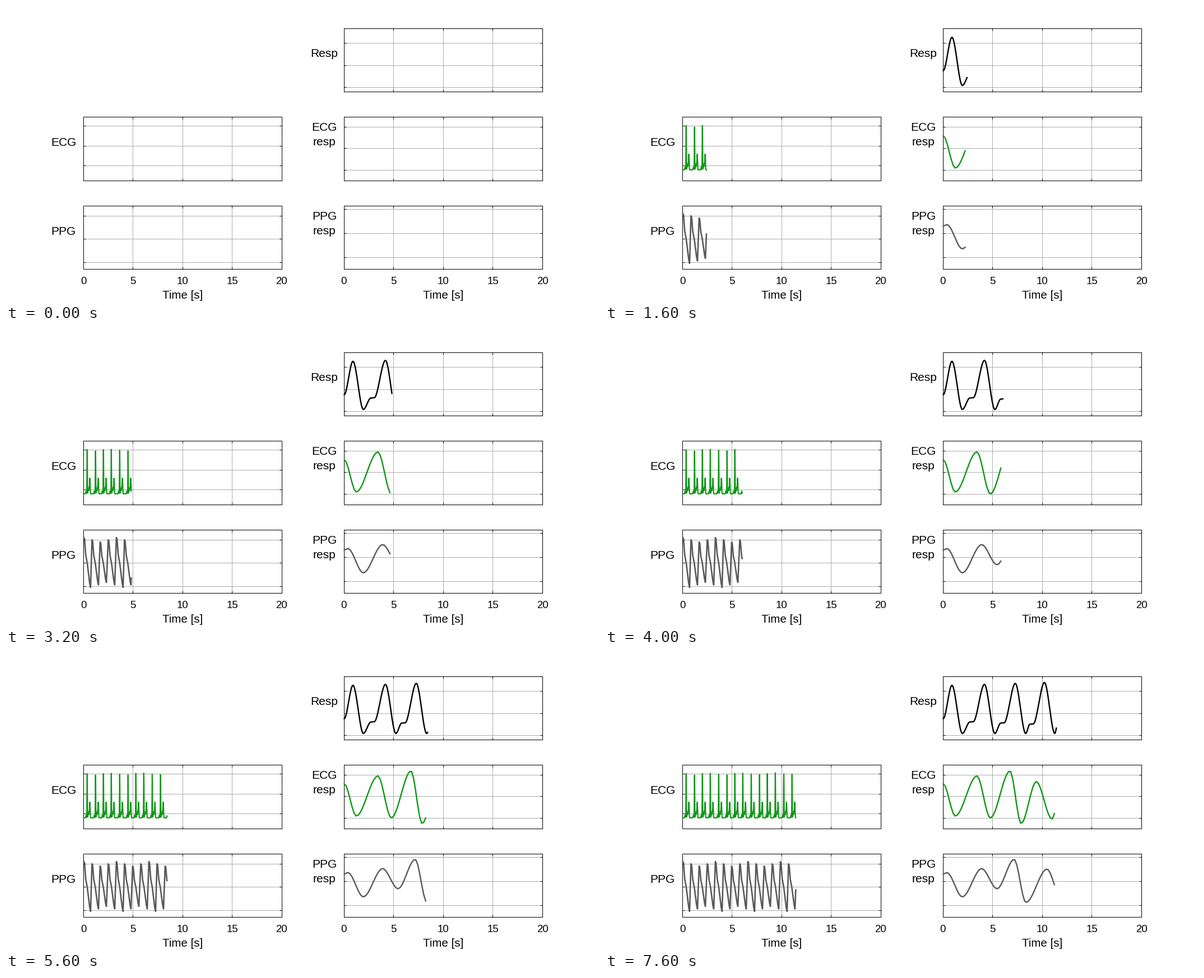
A matplotlib script for the animation above (8000 ms loop, 1058 px wide and 529 px high).

```python
import numpy as np
import matplotlib.pyplot as plt
from matplotlib.animation import FuncAnimation

W, H, DPI = 1058, 529, 100
PT = 72 / DPI                  # points per pixel
LEFT, RIGHT, SPAN = 138, 603, 354
RATE = SPAN / 20               # pixels per second of signal
FRAMES, STEP = 20, 0.6         # seconds of signal added per frame
BEAT, BEATS = 14.5, 15         # heartbeat spacing in pixels, beats drawn
GREEN, GRAY = "#109618", "#595959"

plt.rcParams["font.family"] = "Liberation Sans"
fig = plt.figure(figsize=(W / DPI, H / DPI), dpi=DPI, facecolor="white")
ax = fig.add_axes([0, 0, 1, 1])
ax.set_xlim(-0.5, W - 0.5)     # whole numbers are pixel centres
ax.set_ylim(H - 0.5, -0.5)
ax.axis("off")


def stroke(xs, ys, color="black", width=1, z=2, cap="butt"):
    return ax.plot(xs, ys, color=color, lw=width * PT, zorder=z, snap=False,
                   solid_joinstyle="round", solid_capstyle=cap)[0]


def label(x, y, text, size):
    ax.text(x - 0.5, y - 0.7, text, fontsize=size * PT,
            ha="center", va="baseline")


def panel(x, top, bottom, levels):
    end = x + SPAN
    for y in levels:
        stroke([x, end], [y, y], "0.68", z=1)
        stroke([x, x + 4], [y, y])
        stroke([end - 4, end], [y, y])
    for sec in (5, 10, 15):
        gx = int(x + sec * RATE)
        stroke([gx, gx], [top, bottom], "0.68", z=1)
        stroke([gx, gx], [top, top + 4])
        stroke([gx, gx], [bottom - 4, bottom])
    stroke([x, end, end, x, x], [top, top, bottom, bottom, top],
           cap="projecting")


def swing(points, seconds):
    """Ease in and out between turning points, sampled every few seconds."""
    px, py = np.array(points, float).T
    xs = np.arange(RIGHT, px[-1], seconds * RATE)
    i = np.clip(np.searchsorted(px, xs) - 1, 0, len(px) - 2)
    u = (xs - px[i]) / (px[i + 1] - px[i])
    return xs, py[i] + (py[i + 1] - py[i]) * u * u * (3 - 2 * u)


def resp_curve():
    def peak(k):               # breaths come slightly faster each time
        return 618.5 + 59.5 * k - 1.5 * k * k

    points = [(RIGHT, 115)]
    for k in range(4):
        rest = 121 + 2 * k
        points += [(peak(k), 55.5 - 1.7 * k), (peak(k) + 18.6, 141.5),
                   (peak(k + 1) - 26, rest), (peak(k + 1) - 20, rest - 0.5)]
    return swing(points, 0.02)


def ecg_resp_curve():
    return swing([(603, 231.5), (624.5, 289), (663, 217.5), (687, 292.5),
                  (722, 208.5), (742, 302.5), (769, 227.5), (797, 294.5),
                  (815, 225)], 0.2)


def ppg_resp_curve():
    return swing([(603, 393), (609.5, 390), (637, 433.5), (671.5, 383),
                  (699, 419), (729.5, 366.5), (750.5, 443.5), (788, 384),
                  (812, 432)], 0.2)


def ecg_curve():
    xs = np.arange(LEFT, LEFT + 12 * RATE, 0.1)
    ys = np.full_like(xs, 292.3)
    for n in range(BEATS):
        breath = np.cos(2 * np.pi * (n - 1) / 3.9)
        beat = 144.3 + BEAT * n + 0.45 * breath
        # P wave, R spike, ripples and T wave: offset, height, width
        for dx, height, width in ((-2, 5, 0.5), (0, 79 - 1.5 * breath, 0.3),
                                  (2, 9, 0.5), (3.4, 11, 0.4), (4.8, 28, 0.5)):
            ys -= height * np.exp(-((xs - beat - dx) / width) ** 2 / 2)
    return xs, ys


def ppg_curve():
    fall = ((0, 0), (0.1, 0.03), (0.28, 0.35), (0.5, 0.51), (0.87, 0.92), (1, 1))
    points = []
    for n in range(BEATS):
        breath = np.cos(np.pi * (n - 2) / 2)
        x, top = 138.4 + BEAT * n, 374.5 + 4 * breath
        length, depth = 11.6 - 0.4 * breath, 455 - 4.5 * breath - top
        points += [(x + u * length, top + v * depth) for u, v in fall]
    return np.array(points).T


panel(RIGHT, 40, 153, (66, 106, 145))
panel(LEFT, 198, 312, (214, 250, 285))
panel(RIGHT, 198, 312, (216, 254, 293))
panel(LEFT, 357, 470, (375, 416, 458))
panel(RIGHT, 357, 470, (363, 406, 449))

label(568, 91, "Resp", 21)
for text, y in (("ECG", 250), ("PPG", 409)):
    label(102.5, y, text, 21)
    label(568, y - 27, text, 21)
    label(568, y - 0.5, "resp", 21)
for x in (LEFT, RIGHT):
    for sec in range(0, 21, 5):
        label(x + sec * RATE, 497, str(sec), 18.7)
    label(x + SPAN / 2, 523, "Time [s]", 20.5)

# origin x, lag in seconds, curve, colour, line width
traces = [(x, lag, curve, stroke([], [], color, width, 4, "projecting"))
          for x, lag, curve, color, width in (
              (RIGHT, 0, resp_curve(), "black", 2.4),
              (LEFT, 0, ecg_curve(), GREEN, 2.2),
              (RIGHT, 0.2, ecg_resp_curve(), GREEN, 2.4),
              (LEFT, 0, ppg_curve(), GRAY, 2.6),
              (RIGHT, 0.2, ppg_resp_curve(), GRAY, 2.4))]


def update(n):
    for x, lag, (xs, ys), line in traces:
        if n == 0:
            line.set_data([], [])
            continue
        end = x + (n * STEP - lag) * RATE
        keep = xs < end
        line.set_data(np.append(xs[keep], end),
                      np.append(ys[keep], np.interp(end, xs, ys)))
    return [line for *_, line in traces]


anim = FuncAnimation(fig, update, frames=FRAMES, interval=400,
                     repeat=True, repeat_delay=0, blit=False)
plt.show()
```
